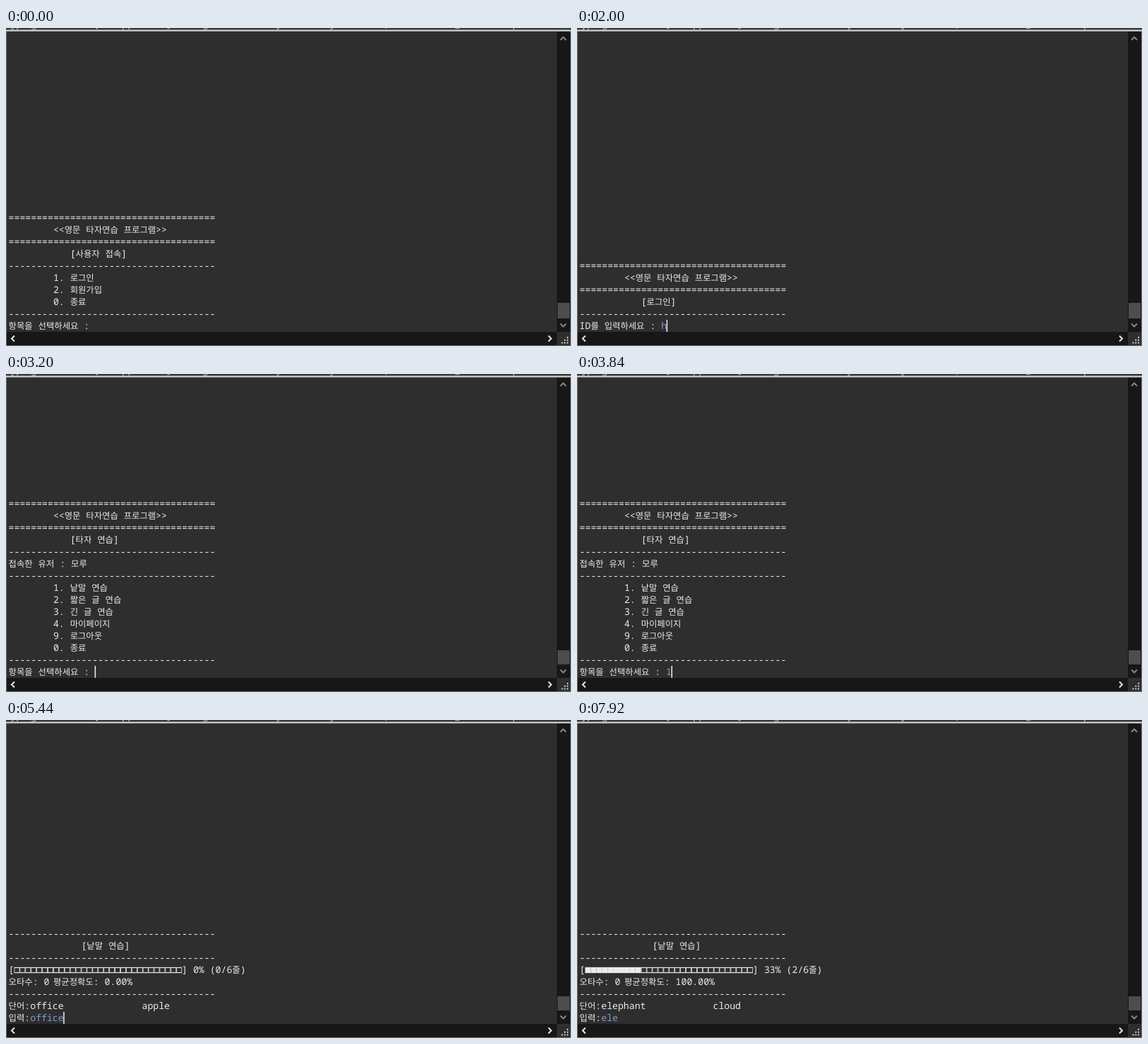
An HTML page with a canvas that plays this animation: 800x450 px, repeating every 8 s.

```html
<!DOCTYPE html>
<html lang="ko">
<head>
<meta charset="utf-8">
<title>Typing practice console</title>
<style>
  html, body { margin: 0; width: 100%; height: 100%; overflow: hidden; background: #2e2e2f; }
  canvas { display: block; }
</style>
</head>
<body>
<canvas id="stage" width="800" height="450"></canvas>
<script>
const ctx = document.getElementById('stage').getContext('2d');
const LOOP = 8000, LEFT = 3.6, COL = 7.92, ROW = 17, BASELINE = 425.8;
const LATIN = '500 13.2px "Noto Sans Mono", "DejaVu Sans Mono", monospace';
const HANGUL = '500 12.35px "Noto Sans CJK KR", "Noto Sans CJK", sans-serif';
const WHITE = '#ebebeb', BLUE = '#7f9dcc';

// Screens. Text after "|" is user input; the last line is the active prompt.
const double = '='.repeat(37), single = '-'.repeat(37);
const header = title => [double, '        <<영문 타자연습 프로그램>>', double, '           [' + title + ']', single];
const menu = items => [...items.map(item => '        ' + item), single, '항목을 선택하세요 : |'];
const access = [...header('사용자 접속'), ...menu(['1. 로그인', '2. 회원가입', '0. 종료'])];
const USER_ID = 'hodru';
const login = [...header('로그인'), 'ID를 입력하세요 : |'];
const password = [...header('로그인'), 'ID를 입력하세요 : |' + USER_ID, '비밀번호를 입력하세요 : |'];
const mainMenu = [...header('타자 연습'), '접속한 유저 : 모루', single,
  ...menu(['1. 낱말 연습', '2. 짧은 글 연습', '3. 긴 글 연습', '4. 마이페이지', '9. 로그아웃', '0. 종료'])];
const words = ['office', 'apple', 'elephant', 'cloud'];
const practice = done => [single, '             [낱말 연습]', single,
  '[' + '■'.repeat(done * 5) + '□'.repeat(30 - done * 5) + `] ${Math.floor(done * 100 / 6)}% (${done}/6줄)`,
  `오타수: 0\t\t평균정확도: ${done ? '100.00' : '0.00'}%`, single,
  '단어:' + words[done].padEnd(20) + words[done + 1], '입력:|'];

// Timeline: hard changes of screen, input, caret and line feed.
const steps = [];
const at = (time, lines, input = '', caret = true, fed = false) =>
  steps.push({ time, lines, input, caret, fed });
const type = (lines, text, times, from = 1) =>
  times.forEach((time, i) => at(time, lines, text.slice(0, from + i)));

at(0, access, '', false);
at(240, access, '1');
at(800, access, '1', false);
at(1200, access, '1', true, true);
at(1360, login);
at(1840, login, '', false);
at(2000, login, USER_ID.slice(0, 1));
type(login, USER_ID, [2080, 2160, 2320], 3);
at(2480, password);
type(password, USER_ID, [2640, 2720, 2880, 2960, 3120]);
at(3200, mainMenu);
at(3680, mainMenu, '', false);
at(3840, mainMenu, '1');
at(3920, mainMenu, '1', true, true);
at(4000, practice(0), '', false);
type(practice(0), 'office', [4720, 4800, 4960, 5040, 5200, 5360]);
at(5520, practice(0), 'office', true, true);
at(5600, practice(1), '', false);
type(practice(1), 'app', [5920, 6160, 6240]);
type(practice(1), 'apple', [6480, 6560, 6640, 6800, 6880]);
at(7040, practice(2), '', false);
type(practice(2), 'ele', [7360, 7440, 7520]);
at(7840, practice(2), 'ele', false);

function rect(color, x, y, w, h) {
  ctx.fillStyle = color;
  ctx.fillRect(x, y, w, h);
}

function drawRun(run, x, y, color) {
  if (run === '\t') return LEFT + (Math.floor((x - LEFT) / COL / 8) + 1) * 8 * COL;
  if (/[■□]/.test(run)) {
    for (const box of run) {
      rect(WHITE, x, y - 8, COL, 8.3);
      if (box === '□') rect('#2e2e2f', x + 0.8, y - 6.8, COL - 1.6, 5.9);
      x += COL;
    }
    return x;
  }
  ctx.font = /[가-힣]/.test(run) ? HANGUL : LATIN;
  ctx.fillStyle = color;
  ctx.fillText(run, x, y);
  return x + ctx.measureText(run).width;
}

function drawLine(line, y) {
  let x = LEFT;
  line.split('|').forEach((part, i) => {
    for (const run of part.match(/[가-힣]+|[■□]+|\t|[^가-힣■□\t]+/g) || [])
      x = drawRun(run, x, y, i ? BLUE : WHITE);
  });
  return x;
}

function chevron(x, y, angle, color) {
  ctx.save();
  ctx.translate(x, y);
  ctx.rotate(angle);
  ctx.strokeStyle = color;
  ctx.lineWidth = 2;
  ctx.beginPath();
  ctx.moveTo(-4, 2);
  ctx.lineTo(0, -2);
  ctx.lineTo(4, 2);
  ctx.stroke();
  ctx.restore();
}

function drawWindow(thumbBottom, thumbHeight) {
  rect('#2e2e2f', 0, 0, 800, 450);
  rect('#383838', 0, 0, 800, 3);

  // Only the lower edge of the title line is in view.
  ctx.font = '14px "Noto Sans", sans-serif';
  ctx.fillStyle = '#c4c4c4';
  const title = [['yping', 7], ['[', 126], ['pp', 164], [']', 228], ['g', 278],
    ['y', 383], ['y', 459], ['(', 535], ['_', 636], ['p', 717]];
  for (const [text, x] of title) ctx.fillText(text, x, -1);
  rect('#d2d2d2', 0, 2.5, 800, 2.2);

  rect('#171717', 780, 5, 19, 425);
  rect('#171717', 1, 430, 779, 19);
  rect('#4d4d4d', 781, thumbBottom - thumbHeight, 17, thumbHeight);
  chevron(789, 15, 0, '#858585');
  chevron(789, 420.5, Math.PI, '#858585');
  chevron(10, 439.5, -Math.PI / 2, '#e4e4e4');
  chevron(770, 439.5, Math.PI / 2, '#e4e4e4');
  for (let row = 0; row < 3; row++)
    for (let col = row; col < 3; col++)
      rect('#d0d0d0', 786.5 + col * 3.8, 444.5 - row * 3.8, 2, 2);

  rect('#707070', 0, 5, 1, 445);
  rect('#707070', 799, 5, 1, 445);
  rect('#707070', 0, 449, 800, 1);
}

function draw(now) {
  const time = now % LOOP;
  const step = steps.findLast(s => s.time <= time);
  const lines = [...step.lines];
  lines[lines.length - 1] += step.input;
  if (step.fed) lines.push('');

  // The thumb shrinks as the history grows with the main menu.
  const thumbHeight = step.time < 3200 ? 22 : 20;
  ctx.textRendering = 'geometricPrecision';
  drawWindow(step.fed ? 383 : 411, thumbHeight);
  let end = LEFT;
  lines.forEach((line, i) => {
    end = drawLine(line, BASELINE - (lines.length - 1 - i) * ROW);
  });
  if (step.caret) rect('#f0f0f0', end - 0.5, 413, 1.5, 17);
}

const start = performance.now();
function loop() {
  draw(performance.now() - start);
  requestAnimationFrame(loop);
}
loop();
</script>
</body>
</html>
```
